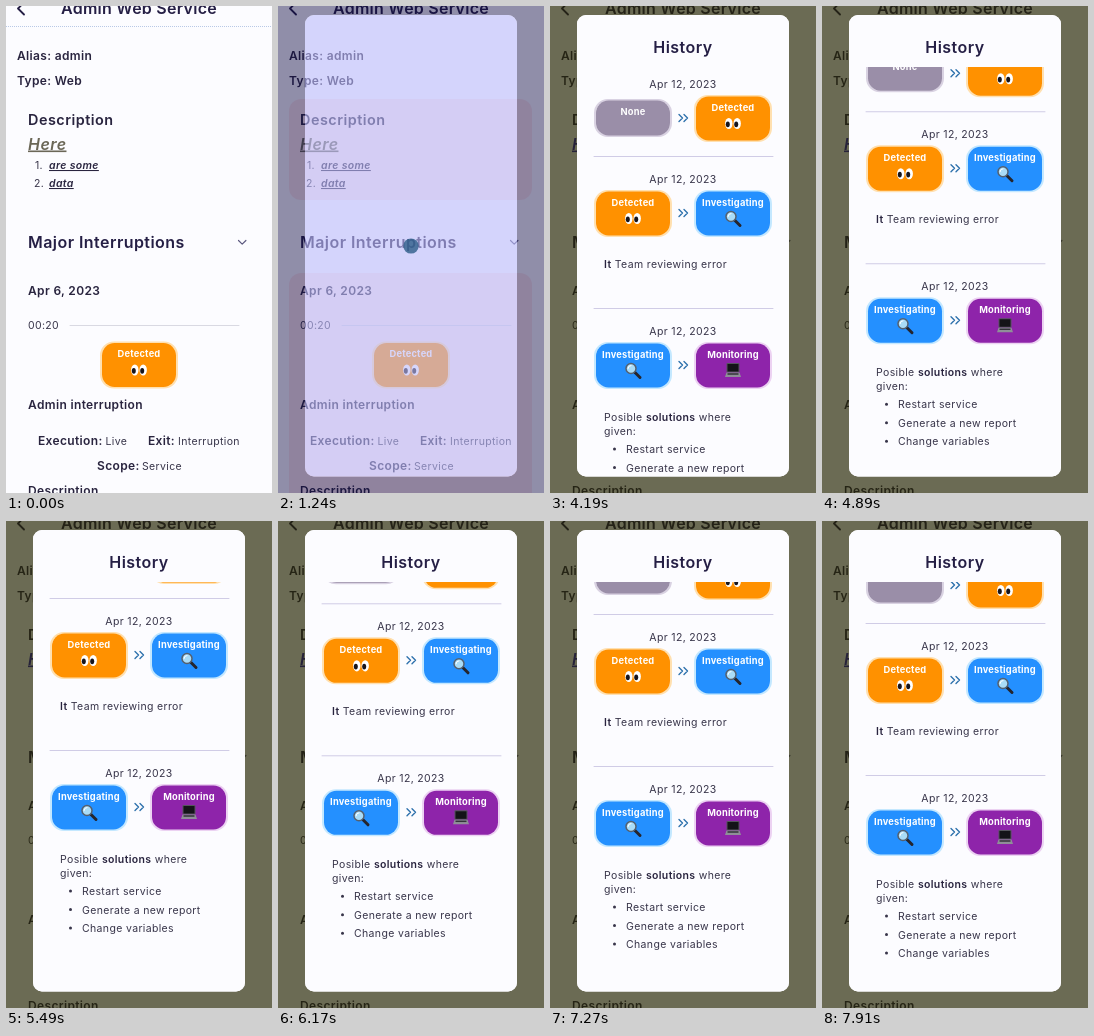
An HTML page that plays this animation: 266 px wide and 487 px high, repeating every 8 s.

```html
<!DOCTYPE html>
<html lang="en">
<head>
<meta charset="utf-8">
<title>Service history</title>
<style>
  html, body { margin: 0; width: 100%; height: 100%; overflow: hidden; background: #fcfcff; }
  svg { display: block; width: 100%; height: 100%; font-family: Inter, Roboto, sans-serif; }
  text { fill: #38354a; font-size: 10.5px; letter-spacing: .35px; white-space: pre; }
  .b { font-weight: 600; fill: #29243f; }
  .m { font-size: 12px; }
  .sub { font-size: 14.4px; letter-spacing: .5px; }
  .h { font-size: 16px; letter-spacing: .45px; fill: #251f45; }
  .link { font-style: italic; text-decoration: underline; }
  .c { text-anchor: middle; }
  .tag { font-size: 9.3px; font-weight: 700; letter-spacing: .2px; fill: #fff; }
  .line { fill: none; stroke-linecap: round; stroke-linejoin: round; }
</style>
</head>
<body>
<svg viewBox="0 0 266 487" preserveAspectRatio="none">
  <defs>
    <clipPath id="listClip"><rect x="27" y="61" width="212" height="409"/></clipPath>
    <g id="eyes">
      <ellipse cx="-4.2" rx="3.7" ry="5.6" fill="#fff"/>
      <ellipse cx="4.2" rx="3.7" ry="5.6" fill="#fff"/>
      <ellipse cx="-5.2" cy=".8" rx="2" ry="2.9" fill="#17151c"/>
      <ellipse cx="3.2" cy=".8" rx="2" ry="2.9" fill="#17151c"/>
    </g>
    <g id="lens">
      <path d="M2 2L7 7" stroke="#25252d" stroke-width="3" stroke-linecap="round"/>
      <circle cx="-2" cy="-2" r="5" fill="#a9dcf7" stroke="#55606e" stroke-width="1.5"/>
      <path d="M-5 -2A3 3 0 0 1 -2 -5" class="line" stroke="#fff"/>
    </g>
    <g id="laptop">
      <rect x="-6.5" y="-7.5" width="13" height="9.5" rx="1" fill="#55555d"/>
      <rect x="-5.5" y="-6.5" width="11" height="7.5" fill="#141318"/>
      <path d="M-6.5 2H6.5L8 6.5H-8Z" fill="#8f8f98"/>
      <path d="M-5.5 3.5H5.5" stroke="#33323a" stroke-width="1.5"/>
    </g>
  </defs>
  <rect width="266" height="487" fill="#fcfcff"/>
  <g id="cards" fill="#ff9b9b">
    <rect x="11" y="93" width="243" height="101" rx="12"/>
    <rect x="11" y="267" width="243" height="240" rx="12"/>
  </g>
  <g id="page"></g>
  <path id="barrier" fill-rule="evenodd"
    d="M0 0H266V487H0ZM36 9H230a9 9 0 0 1 9 9V461.500a9 9 0 0 1-9 9H36a9 9 0 0 1-9-9V18a9 9 0 0 1 9-9Z"/>
  <rect id="modal" x="27" y="9" width="212" height="461.500" rx="9"/>
  <g id="spinner" opacity=".76"><circle cx="133" cy="240"/><circle cx="133" cy="240" opacity=".6"/></g>
  <g id="history">
    <text class="b h c" x="133" y="46.500">History</text>
    <g clip-path="url(#listClip)"><g id="list"></g></g>
  </g>
</svg>
<script>
const $ = id => document.getElementById(id);
const LOOP = 8000, CONTENT_AT = 2500;

const states = {
  None: { fill: '#9a8ea8', glow: '#d9d2e2' },
  Detected: { fill: '#ff9100', glow: '#ffe0b0', icon: 'eyes' },
  Investigating: { fill: '#2490ff', glow: '#c4e8ff', icon: 'lens' },
  Monitoring: { fill: '#8e24aa', glow: '#ecd2f2', icon: 'laptop' }
};

const text = (x, y, s, cls = '') => `<text x="${x}" y="${y}" class="${cls}">${s}</text>`;
const stroke = (d, color, w = 1) => `<path class="line" d="${d}" stroke="${color}" stroke-width="${w}"/>`;

function chip(cx, y, name) {
  const { fill, glow, icon } = states[name];
  const h = icon ? 44 : 35, top = icon ? y : y + 4;
  return `<rect x="${cx - 38}" y="${top - .5}" width="76" height="${h + 1}" rx="13" fill="none" stroke="${glow}" stroke-width="2"/>
    <rect x="${cx - 37}" y="${top}" width="74" height="${h}" rx="12.5" fill="${fill}"/>` +
    text(cx, top + 14, name, 'tag c') +
    (icon ? `<use href="#${icon}" x="${cx}" y="${y + 27}"/>` : '');
}

function entry(y, from, to) {
  return text(133, y + 4, 'Apr 12, 2023', 'c') + chip(83, y + 12.5, from) + chip(183, y + 12.5, to) +
    stroke(`M129 ${y + 30.5}l3.500 3.500-3.500 3.500M134 ${y + 30.5}l3.500 3.500-3.500 3.500`, '#2f72ad', 1.4);
}

const bold = s => `<tspan class="b">${s}</tspan>`;
const bullet = (y, s) => `<circle cx="64.500" cy="${y - 4}" r="1.500" fill="#38354a"/>` + text(76, y, s);

$('page').innerHTML =
  stroke('M18 -3.500L12 2.500L18 8.500', '#251f45', 1.8) +
  '<text class="b h c" x="133" y="8" style="letter-spacing:.25px">Admin Web Service</text>' +
  '<path id="rule" d="M0 20.500H266" stroke="#b9c9e6" stroke-dasharray="1 1"/>' +
  text(11, 54, 'Alias: admin', 'b m') +
  text(11, 79, 'Type: Web', 'b m') +
  text(22, 119, 'Description', 'b sub') +
  '<text id="here" class="b h link" x="22" y="143.500">Here</text>' +
  text(29, 163, '1.') + text(43, 163, 'are some', 'b link') +
  text(28, 181, '2.') + text(43, 181, 'data', 'b link') +
  text(22, 242, 'Major Interruptions', 'b h') +
  stroke('M232.500 234.500l3.700 3.700 3.700-3.700', '#5d5a80', 1.2) +
  text(22, 289, 'Apr 6, 2023', 'b m') +
  text(22, 323, '00:20') +
  stroke('M64 319.500H233', '#d9d9e2') +
  chip(133, 337, 'Detected') +
  text(22, 403, 'Admin interruption', 'b m') +
  text(32, 439, 'Execution:', 'b m') + text(99.5, 439, 'Live') +
  text(142, 439, 'Exit:', 'b m') + text(172, 439, 'Interruption') +
  text(91, 464, 'Scope:', 'b m') + text(136, 464, 'Service') +
  text(22, 489, 'Description', 'b m');

$('list').innerHTML =
  entry(78, 'None', 'Detected') +
  stroke('M44 150.500H223', '#d0cce6') +
  entry(173, 'Detected', 'Investigating') +
  text(54, 262, bold('It') + ' Team reviewing error') +
  stroke('M44 302.500H223', '#d0cce6') +
  entry(325, 'Investigating', 'Monitoring') +
  text(54, 414.5, `Posible ${bold('solutions')} where`) +
  text(54, 428.5, 'given:') +
  bullet(447, 'Restart service') + bullet(465.5, 'Generate a new report') + bullet(484, 'Change variables');

// Keys are [time, value]; each span uses the given easing.
const linear = k => k;
const smooth = k => k * k * (3 - 2 * k);
function track(keys, t, ease) {
  if (t <= keys[0][0]) return keys[0][1];
  for (let i = 1; i < keys.length; i++) {
    const [t0, a] = keys[i - 1], [t1, b] = keys[i];
    if (t < t1) return a + (b - a) * ease((t - t0) / (t1 - t0));
  }
  return keys[keys.length - 1][1];
}
const mix = (a, b, k) => `rgb(${a.map((v, i) => Math.round(v + (b[i] - v) * k))})`;

const fadeKeys = [[1140, 0], [1240, .6], [1340, .6], [1420, 1]];
const dimKeys = [[0, 0], [.6, .45], [1, .67]];
const scrollKeys = [[4200, 0], [5400, 73], [5870, 73], [6650, 57], [7550, 57], [7910, 48]];
const [dotA, dotB] = $('spinner').children;

function draw(t) {
  const fade = track(fadeKeys, t, linear);
  const settle = Math.max(0, (fade - .6) / .4);
  $('cards').setAttribute('opacity', .8 * fade * (1 - fade));
  $('rule').setAttribute('opacity', Math.max(0, 1 - fade * 2));
  $('here').style.fill = mix([107, 103, 87], [42, 31, 174], settle);
  $('barrier').setAttribute('fill', mix([13, 7, 66], [36, 36, 0], settle));
  $('barrier').setAttribute('opacity', track(dimKeys, fade, linear));
  $('modal').setAttribute('fill', mix([187, 187, 250], [252, 252, 255], settle));
  $('modal').setAttribute('opacity', fade);

  const loaded = t >= CONTENT_AT;
  const pulse = Math.cos(Math.PI * (t - 1380) / 2000) ** 2;
  $('spinner').style.display = fade > 0 && !loaded ? '' : 'none';
  $('spinner').setAttribute('fill', mix([38, 88, 132], [57, 121, 154], settle));
  dotA.setAttribute('r', 8 * Math.max(pulse, 1 - pulse));
  dotB.setAttribute('r', 8 * Math.min(pulse, 1 - pulse));

  $('history').style.display = loaded ? '' : 'none';
  $('list').setAttribute('transform', `translate(0 ${-track(scrollKeys, t, smooth)})`);
}

const start = performance.now();
function tick() {
  draw((performance.now() - start) % LOOP);
  requestAnimationFrame(tick);
}
tick();
</script>
</body>
</html>
```
